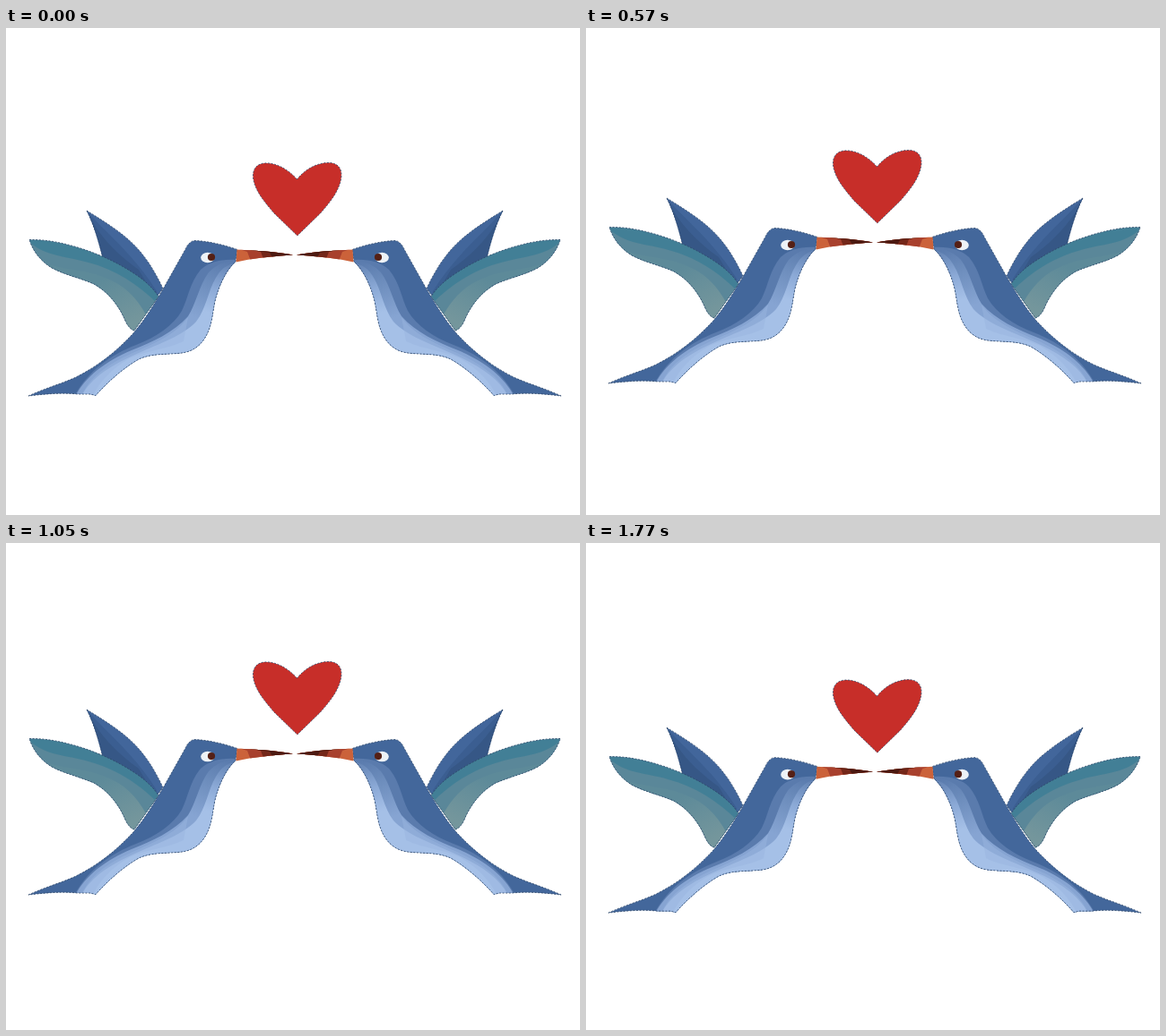
Write an HTML page that moves like this. It is 640 px wide and 544 px high and loops after 1.8 s.

```html
<!DOCTYPE html>
<html lang="en">
<head>
<meta charset="utf-8">
<title>Hummingbirds and heart</title>
<style>
  html, body { margin: 0; width: 100%; height: 100%; overflow: hidden; background: #fff; }
  svg { display: block; width: 640px; height: 544px; }
  .edge { stroke: #2d4668; stroke-width: .8; stroke-dasharray: 2 1.6; }
</style>
</head>
<body>
<svg viewBox="0 0 640 544">
  <defs>
    <linearGradient id="shade" gradientUnits="userSpaceOnUse" x1="242" y1="260" x2="215" y2="325">
      <stop offset="0" stop-color="#5b7cae"/>
      <stop offset=".45" stop-color="#6f8fbe"/>
      <stop offset="1" stop-color="#86a4d2"/>
    </linearGradient>
    <linearGradient id="light" gradientUnits="userSpaceOnUse" x1="244" y1="264" x2="226" y2="318">
      <stop offset="0" stop-color="#6787b7"/>
      <stop offset=".5" stop-color="#8ba9d6"/>
      <stop offset="1" stop-color="#a5c0e7"/>
    </linearGradient>
    <linearGradient id="wingShade" gradientUnits="userSpaceOnUse" x1="112" y1="278" x2="138" y2="330">
      <stop offset="0" stop-color="#5d8a99"/>
      <stop offset="1" stop-color="#74969c"/>
    </linearGradient>
    <path id="body" d="M25 411C42 403 60 398 77 390.500C104 377 123 361 141 342C155 326 166 307 176 290L199 249Q204 238 210 237.500C226 238 242 242 258 247.500L256 261C246 270 239 285 235 298C231 310 231 323 227 335C222 350 212 361 196 363C180 365 163 363 148 370C129 381 113 396 100 410.500L94 409L80 409C61 407 43 409 25 411Z"/>
    <path id="wing" d="M26 236.500C45 236 64 240 83 246C108 254 128 264 147 277C158 285 165 292 170 300L143 338Q137 336 133 327C126 310 114 295 98 286C82 279 66 276 51 268C38 260 30 249 26 236.500Z"/>
    <path id="beak" d="M257.500 247.500C278 248.500 302 250 320 253.500C298 255 276 257 256.500 261.500Z"/>
    <path id="rear" d="M90 204C111 217 134 231 149 249C160 262 168 276 175 291L167 302L109 261C104 241 99 222 90 204Z"/>
    <clipPath id="inBody"><use href="#body"/></clipPath>
    <clipPath id="inWing"><use href="#wing"/></clipPath>
    <clipPath id="inBeak"><use href="#beak"/></clipPath>
    <clipPath id="inRear"><use href="#rear"/></clipPath>

    <g id="bird">
      <use href="#rear" fill="#42669b"/>
      <g clip-path="url(#inRear)">
        <path fill="#3b5e91" d="M90 204C110 228 142 252 168 294L170 310H95Z"/>
        <path fill="#365786" d="M90 204C102 231 124 253 148 270L160 290L95 270Z"/>
      </g>
      <use href="#rear" fill="none" class="edge"/>

      <use href="#wing" fill="#427f96"/>
      <g clip-path="url(#inWing)">
        <path fill="#5a8799" d="M26 239C45 256 69 255 92 262C122 270 147 286 169 308L145 345L25 285Z"/>
        <path fill="url(#wingShade)" d="M40 262C67 271 92 270 113 280C131 287 146 301 157 322L138 345L70 285Z"/>
      </g>
      <use href="#wing" fill="none" class="edge"/>

      <use href="#body" fill="#43679b"/>
      <g clip-path="url(#inBody)">
        <path fill="#5a7bad" d="M258 259Q231 257 217 270C205 284 203 302 196 316C186 333 168 345 145 354C117 365 91 383 76 412H270Z"/>
        <path fill="url(#shade)" d="M258 261Q239 259 226 273C215 288 212 308 203 322C187 340 163 351 140 360C111 372 88 390 77 412H270Z"/>
        <path fill="url(#light)" d="M258 262Q242 264 234 279C225 294 223 314 212 328C197 344 170 353 148 363C118 376 94 391 84 412H270Z"/>
        <path fill="#9ab5df" opacity=".5" d="M203 323L198 350C180 359 157 360 138 369C117 381 105 395 96 412H84C92 390 117 373 146 361C168 351 190 342 203 323Z"/>
      </g>
      <use href="#body" fill="none" class="edge"/>

      <use href="#beak" fill="#cb623a"/>
      <g clip-path="url(#inBeak)">
        <path fill="#a8402d" d="M257 246L269 250L274 263H322V246Z"/>
        <path fill="#742719" d="M266 246L284 250L289 263H322V246Z"/>
        <path fill="#4c1a11" d="M257 246L294 251L300 262H322V246Z"/>
      </g>
      <ellipse cx="224.800" cy="256.500" rx="7.600" ry="5.800" fill="#edf2f6"/>
      <circle cx="229" cy="256" r="4.100" fill="#542016"/>
    </g>
  </defs>

  <g id="scene">
    <use href="#bird"/>
    <use href="#bird" transform="translate(644) scale(-1 1)"/>
    <path class="edge" fill="#c72e29" d="M324.500 169C314 157 300 150 288 151C278 152 275 159 275.500 167C277 181 288 194 299 207L324.800 232L350.500 207C362 194 372 181 373.800 167C375 157 370 151 361 150.500C347 150 333 158 324.500 169Z"/>
  </g>
</svg>
<script>
  const scene = document.getElementById("scene");
  const LOOP = 1800, STEP = 30, PEAK = 850;

  // Accelerating rise, then a decelerating fall.
  function lift(t) {
    if (t < PEAK) return -25 * (t / PEAK) ** 1.45;
    const left = (LOOP - t) / (LOOP - PEAK);
    return -25 + 27.5 * (1 - left ** 1.25);
  }

  function draw() {
    const t = Math.floor(performance.now() % LOOP / STEP) * STEP;
    scene.setAttribute("transform", `translate(0 ${lift(t).toFixed(2)})`);
    requestAnimationFrame(draw);
  }
  draw();
</script>
</body>
</html>
```
